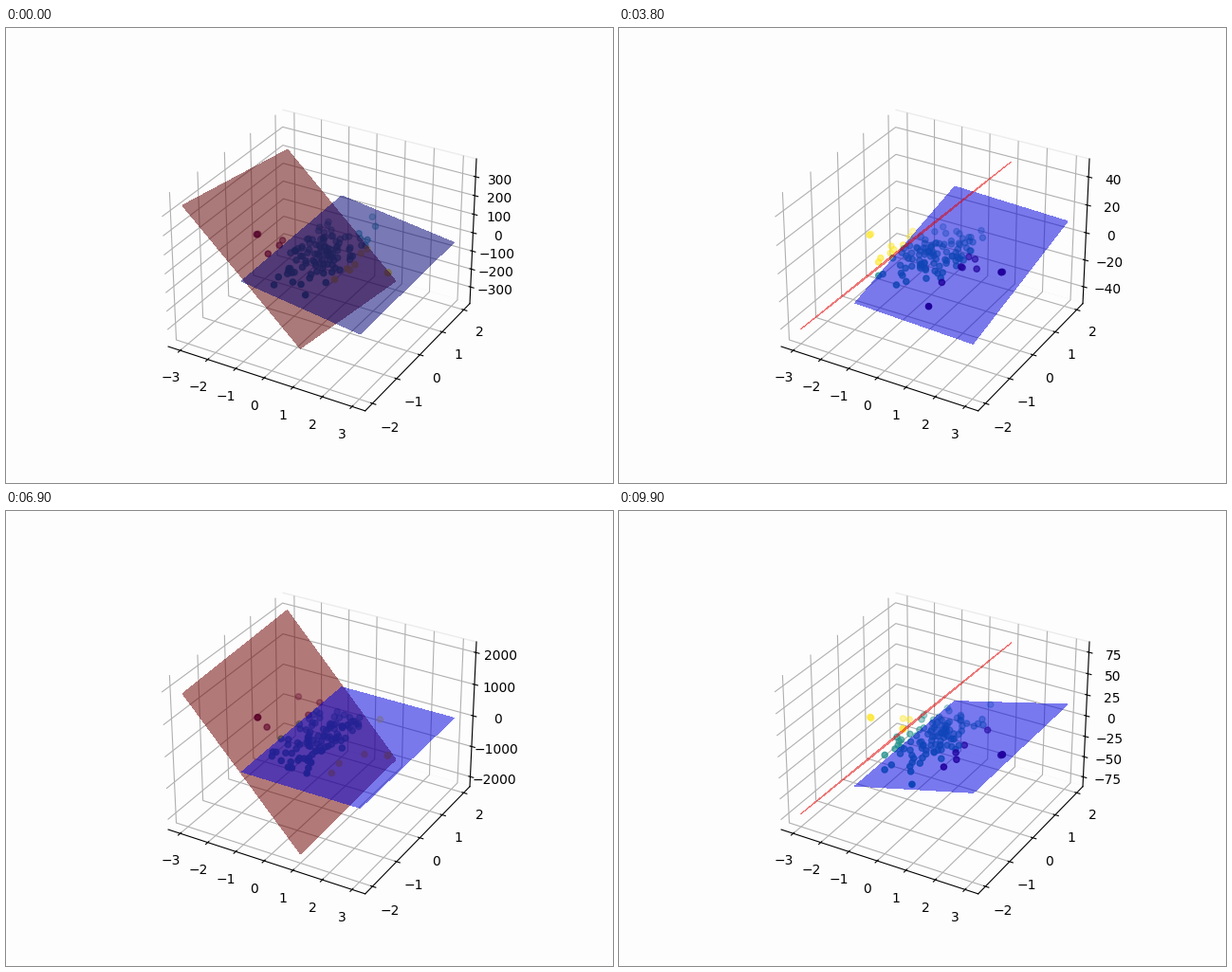
These frames come from a looping animation (640x480 px, 10 s). A matplotlib script:

```python
import numpy as np
import matplotlib.pyplot as plt
from matplotlib.animation import FuncAnimation
from matplotlib.ticker import MaxNLocator

FRAMES = 100
PAPER = "#fdfdfd"
PAD = 1.1 * 25 / 24  # autoscale margin plus axis padding
HALF_X, HALF_Y = 3, 2

# Slopes (along x, along y) held from the given second on
FALL, FLAT, RISE = (-21.8, 2.4), (-0.8, 5.9), (8.4, 0)
BLUE = {0: FALL, 3: FLAT, 7: FALL, 9: RISE}
RED = {0: (-141.5, -30.2), 1: (10.85, 0.25), 2: (22.5, -1.5),
       3: (22, -1), 5: (-978, 39), 9: (36.9, -1.1)}

fig = plt.figure(figsize=(6.4, 4.8), dpi=100, facecolor=PAPER)
ax = fig.add_subplot(projection="3d", computed_zorder=False, facecolor=PAPER)
for axis in (ax.xaxis, ax.yaxis, ax.zaxis):
    axis.set_pane_color(PAPER)
    axis.set_major_locator(MaxNLocator(8, steps=[1, 2, 2.5, 5, 10]))
ax.yaxis.pane.set_edgecolor("#ececec")


def held(keys, second):
    """Latest value whose start has been reached."""
    return keys[max(k for k in keys if k <= second)]


def plane(center, slopes, color, zorder):
    """Translucent plane through zero at x = center."""
    x, y = np.meshgrid([center - 2, center + 2], [-HALF_Y, HALF_Y])
    z = slopes[0] * (x - center) + slopes[1] * y
    ax.plot_surface(x, y, z, color=color, alpha=0.52, zorder=zorder,
                    linewidth=0, antialiased=False)


def sample(i):
    """Gaussian cloud with a few states held at both ends."""
    rng = np.random.default_rng(i)
    x = np.clip(rng.normal(0, 0.62, 110), -2.2, 2.2)
    y = np.clip(rng.normal(0, 0.66, 110), -1.85, 1.85)
    ends = np.repeat([-2.3, 2.3], 3) + rng.normal(0, 0.015, 6)
    return np.append(x, ends), np.append(y, rng.normal(0, 0.02, 6))


def draw(i):
    for artist in list(ax.collections):
        artist.remove()
    red, blue = held(RED, i // 10), held(BLUE, i // 10)
    falling = red[0] < 0

    x, y = sample(i)
    mode = np.where(np.abs(x) > 1, np.sign(x), 0)
    ax.scatter(x, y, np.zeros_like(x), c=mode if falling else -mode,
               cmap="viridis", vmin=-1, vmax=1, zorder=1)
    plane(-1, red, "r", 2 if falling else 3)
    plane(1, blue, "b", 3 if falling else 2)

    top = 2 * np.abs([red, blue]).sum(axis=1).max()
    ax.set_xlim(-HALF_X * PAD, HALF_X * PAD)
    ax.set_ylim(-HALF_Y * PAD, HALF_Y * PAD)
    ax.set_zlim(-top * PAD, top * PAD)
    return []


anim = FuncAnimation(fig, draw, frames=FRAMES, init_func=lambda: draw(0),
                     interval=100, repeat=True, repeat_delay=0)
plt.show()
```
